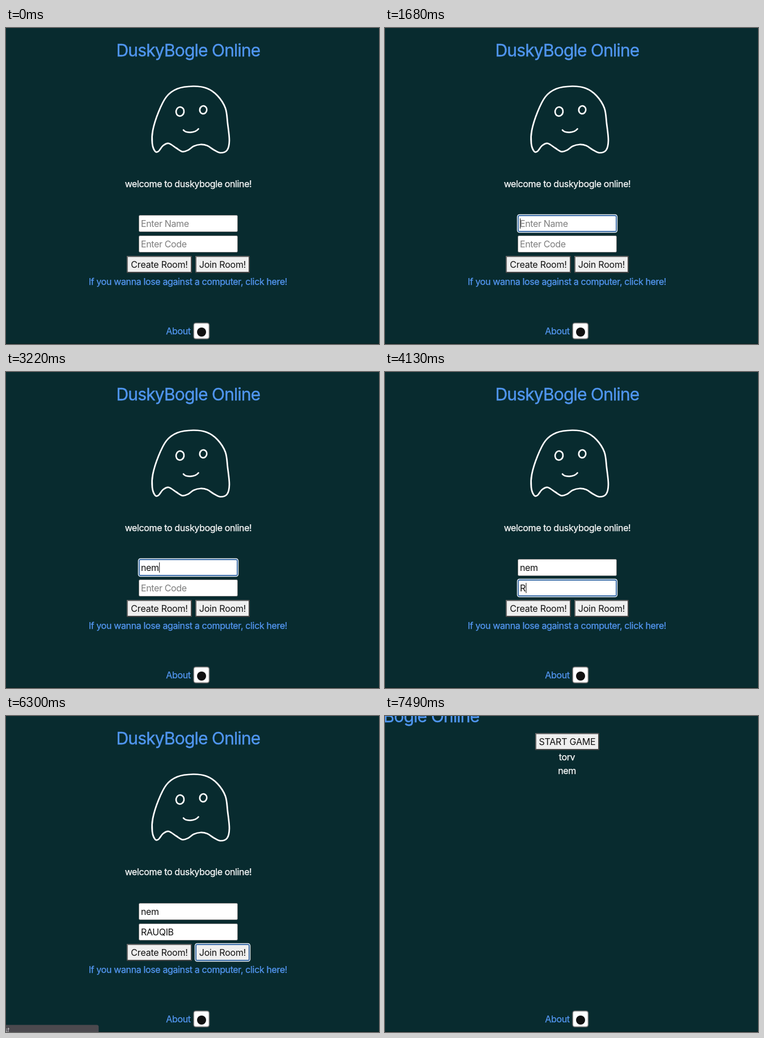
Recreate the animation shown at these times as an HTML page. Size 658 px wide and 556 px high, loop 7560 ms.

```html
<!DOCTYPE html>
<html lang="en">
<head>
<meta charset="utf-8">
<title>DuskyBogle Online</title>
<style>
  html, body { margin: 0; width: 100%; height: 100%; overflow: hidden; background: #082b2f; }
  svg { display: block; position: absolute; left: 0; top: 0; }
  text { font: 16px Inter, Roboto, sans-serif; letter-spacing: -.37px; fill: #fff; stroke: #fff; stroke-width: .25; text-anchor: middle; }
  .title { font-size: 30px; letter-spacing: -.85px; fill: #5096f0; stroke: #5096f0; stroke-width: .4; }
  .link { fill: #5599f5; stroke: #5599f5; }
  .dark { fill: #111; stroke: none; }
  .button { letter-spacing: -.2px; }
  .left { text-anchor: start; }
  .right { text-anchor: end; }
  .hint { fill: #7d7d7d; stroke: none; }
  .ghost { fill: none; stroke: #fff; stroke-width: 2.7; stroke-linecap: round; stroke-linejoin: round; }
</style>
</head>
<body>
<svg id="stage" width="658" height="556" viewBox="0 0 658 556">
  <rect width="658" height="556" fill="#082b2f"/>
  <rect y="555" width="658" height="1" fill="#06201f"/>
  <g id="form">
    <text class="title" x="321.5" y="50">DuskyBogle Online</text>
    <g class="ghost">
      <path id="body"/>
      <ellipse cx="307" cy="147" rx="7" ry="8" transform="rotate(8 307 147)"/>
      <ellipse cx="348" cy="144" rx="6.2" ry="7" transform="rotate(10 348 144)"/>
      <path d="M313 179.500C317 185 333 185.500 339.500 177.500"/>
    </g>
    <text x="321.5" y="280">welcome to duskybogle online!</text>
    <g id="fields"></g>
    <text class="link" x="321" y="452">If you wanna lose against a computer, click here!</text>
  </g>
  <g id="lobby">
    <text class="title right" x="166.5" y="11">DuskyBogle Online</text>
    <g id="start"></g>
    <g id="players">
      <text x="321" y="78">torv</text>
      <text x="321" y="102">nem</text>
    </g>
  </g>
  <g id="footer">
    <text class="link" x="304" y="539">About</text>
    <rect x="331" y="519" width="27.500" height="28" rx="4" fill="#fff" stroke="#6b6b6b" stroke-width="1.6"/>
    <circle cx="345" cy="535" r="8" fill="#111"/>
  </g>
  <g id="status">
    <path d="M0 543.500H160Q163.500 543.500 163.500 547V556H0Z" fill="#4b494e"/>
    <text class="left" x="-3.500" y="557" style="font-size:12px;fill:#c9c9cb;stroke:none">st</text>
  </g>
</svg>
<script>
const LOOP = 7560;
const $ = id => document.getElementById(id);

function add(parent, tag, attrs, text = '') {
  const el = document.createElementNS('http://www.w3.org/2000/svg', tag);
  for (const k in attrs) el.setAttribute(k, attrs[k]);
  el.textContent = text;
  parent.append(el);
  return el;
}

const show = (el, on) => el.setAttribute('visibility', on ? 'visible' : 'hidden');

// Closed Catmull-Rom curve through the points.
function smooth(pts) {
  const n = pts.length, at = i => pts[(i + n) % n];
  let d = 'M' + pts[0];
  for (let i = 0; i < n; i++) {
    const [a, b, c, e] = [at(i - 1), at(i), at(i + 1), at(i + 2)];
    const p = [0, 1].map(k => b[k] + (c[k] - a[k]) / 6);
    const q = [0, 1].map(k => c[k] - (e[k] - b[k]) / 6);
    d += `C${p} ${q} ${c}`;
  }
  return d;
}

$('body').setAttribute('d', smooth([
  [263, 217], [258, 203], [259, 180], [269, 148], [283, 121], [302, 107], [330, 102.5],
  [354, 106], [373, 119], [387, 141], [391, 168], [394, 198], [390, 215], [378, 219.5],
  [366, 214], [355, 207], [343, 205], [331, 208], [321, 215], [311, 217.5], [300, 211],
  [287, 203], [277, 207], [269, 217]
]));

function ring(parent, x, y, w, h) {
  const g = add(parent, 'g', { fill: 'none' });
  add(g, 'rect', { x: x - .4, y: y - .4, width: w + .8, height: h + .8, rx: 3.5, stroke: '#eef4fa', 'stroke-width': 1.6 });
  add(g, 'rect', { x: x + 1.1, y: y + 1.1, width: w - 2.2, height: h - 2.2, rx: 2, stroke: '#2c64a6', 'stroke-width': 1.6 });
  return g;
}

function field(y, hint) {
  const box = $('fields');
  add(box, 'rect', { x: 234.5, y: y + .5, width: 174, height: 29, rx: 2, fill: '#fff', stroke: '#777' });
  const focus = ring(box, 234, y, 175, 30);
  const label = add(box, 'text', { x: 238, y: y + 21 });
  const caret = add(box, 'rect', { y: y + 6, width: 1, height: 18, fill: '#111' });
  return { hint, focus, label, caret };
}

function button(parent, x, y, w, text) {
  add(parent, 'rect', { x: x + 1, y: y + 1, width: w - 2, height: 28, fill: '#efefef', stroke: '#6a6a6a', 'stroke-width': 2 });
  add(parent, 'path', { d: `M${x} ${y + 29}h${w - 1}v-29`, fill: 'none', stroke: '#454545', 'stroke-width': 2 });
  add(parent, 'text', { class: 'dark button', x: x + w / 2, y: y + 21 }, text);
}

const nameBox = field(329, 'Enter Name');
const codeBox = field(365, 'Enter Code');
button($('fields'), 213, 401, 115, 'Create Room!');
button($('fields'), 334, 401, 96, 'Join Room!');
button($('start'), 265, 30, 113, 'START GAME');
const joinRing = ring($('fields'), 334, 401, 96, 30);

function edit(f, t, word, from, to, first, gap) {
  const count = Math.max(0, Math.min(word.length, Math.floor((t - first) / gap) + 1));
  const typed = word.slice(0, count);
  const focused = t >= from && t < to;
  const lastKey = count ? first + (count - 1) * gap : from;
  const value = typed || f.hint;
  if (f.label.textContent !== value) f.label.textContent = value;
  f.label.setAttribute('class', typed ? 'left dark' : 'left hint');
  show(f.focus, focused);
  show(f.caret, focused && (t - lastKey) % 1000 < 500);
  f.caret.setAttribute('x', count ? 238 + f.label.getComputedTextLength() + .5 : 238);
}

const ramp = (t, a, b) => Math.max(0, Math.min(1, (t - a) / (b - a)));

function draw() {
  const t = performance.now() % LOOP;
  const lobby = t >= 6370;
  $('form').style.display = lobby ? 'none' : '';
  $('lobby').style.display = lobby ? '' : 'none';
  $('players').style.display = t >= 6650 ? '' : 'none';
  $('footer').style.display = !lobby || t >= 7210 ? '' : 'none';
  $('status').setAttribute('opacity', ramp(t, 6090, 6230) - ramp(t, 6650, 6930));
  if (!lobby) {
    edit(nameBox, t, 'nem', 1610, 3640, 2730, 210);
    edit(codeBox, t, 'RAUQIB', 3640, 6020, 3990, 210);
    show(joinRing, t >= 6020);
  }
  requestAnimationFrame(draw);
}
draw();
</script>
</body>
</html>
```
